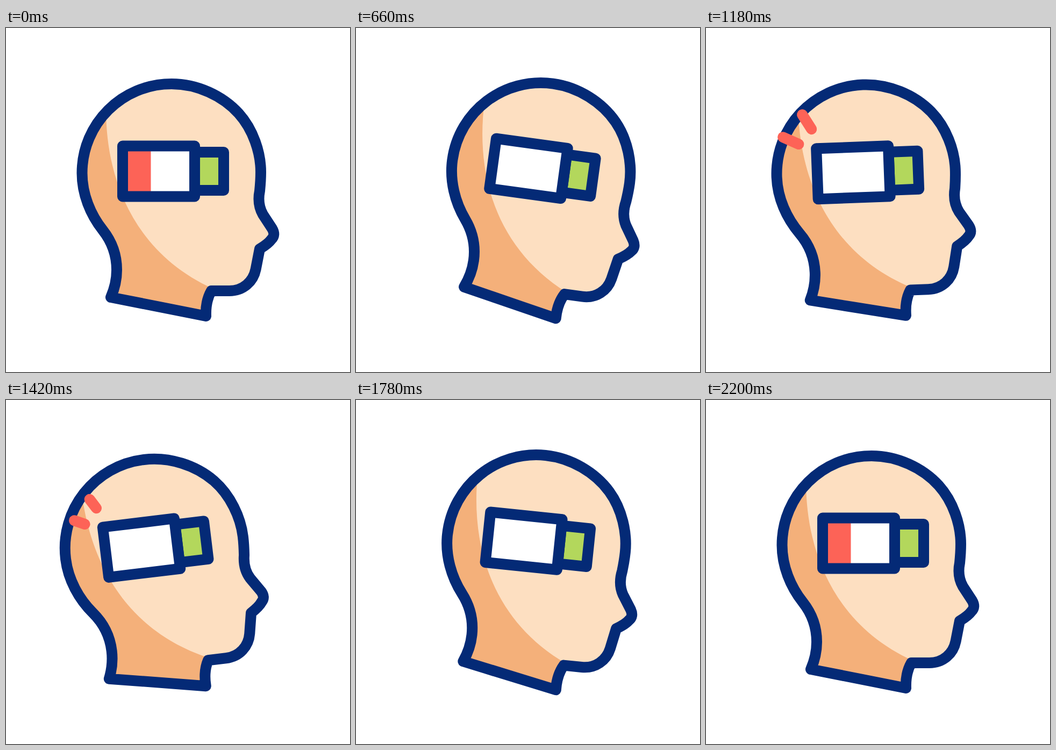
Write an HTML page that moves like this. It is 640x640 px and loops after 2400 ms.

```html
<!DOCTYPE html>
<html lang="en">
<head>
<meta charset="utf-8">
<title>Low battery head</title>
<style>
  html, body { margin: 0; width: 100%; height: 100%; overflow: hidden; background: #fff; }
  svg { display: block; width: 100%; height: 100%; }
  .line { stroke: #042a76; stroke-width: 20; stroke-linejoin: round; }
  .spark { stroke: #fd6357; stroke-width: 20; stroke-linecap: round; }
</style>
</head>
<body>
<svg viewBox="0 0 640 640">
  <defs>
    <path id="outline" d="M195 501L372 536Q371 508 382 489H415.5C441 489 460 472 464.6 449L472 411
      C482 405 489 400 494 393Q502 385 495 373L478 347C470 333 469 318 472 303C473 293 474 282 474 268
      C474 232 460 189 433 159C403 126 356 104 308 104C216 104 141.5 178 141.5 270
      C141.5 309 157 347 180 376C199 400 206 427 206 450C206 468 202 485 195 501Z"/>
    <clipPath id="inside"><use href="#outline"/></clipPath>
  </defs>
  <g id="head">
    <use href="#outline" fill="#fddfc1"/>
    <path clip-path="url(#inside)" fill="#f4b07a"
      d="M186 150C186 293 246 422 385 485L400 560H100V150Z"/>
    <use href="#outline" class="line" fill="none"/>
    <rect class="line" x="351" y="231" width="54" height="71" fill="#b3d75c"/>
    <rect x="217" y="219.5" width="134" height="94" fill="#fff"/>
    <rect id="charge" x="217" y="219.5" height="94" fill="#fd6357"/>
    <rect class="line" x="217" y="219.5" width="134" height="94" fill="none"/>
    <line class="spark" x1="209.5" y1="183"/>
    <line class="spark" x1="184.6" y1="210"/>
  </g>
</svg>
<script>
  const LOOP = 2400;
  const head = document.getElementById('head');
  const charge = document.getElementById('charge');
  const sparks = [...document.querySelectorAll('.spark')];
  const sparkDirs = [[-0.506, -0.863], [-0.899, -0.438]];

  // Keys are [time in ms, value], joined with an ease in and out.
  const tilt = [[200, 0], [800, 9], [1400, -7], [1800, 6], [2200, 0]];
  const level = [[200, 52.5], [800, 0], [1800, 0], [2200, 52.5]];
  const sparkLength = [[800, 0], [1000, 32], [1300, 32], [1600, 0]];

  function valueAt(keys, t) {
    if (t <= keys[0][0]) return keys[0][1];
    for (let i = 1; i < keys.length; i++) {
      const [t0, a] = keys[i - 1], [t1, b] = keys[i];
      if (t < t1) {
        const x = (t - t0) / (t1 - t0);
        return a + (b - a) * x * x * (3 - 2 * x);
      }
    }
    return keys[keys.length - 1][1];
  }

  function draw(t) {
    head.setAttribute('transform', `rotate(${valueAt(tilt, t)} 340 536)`);
    charge.setAttribute('width', valueAt(level, t));
    const length = valueAt(sparkLength, t);
    sparks.forEach((spark, i) => {
      const [dx, dy] = sparkDirs[i];
      spark.setAttribute('x2', +spark.getAttribute('x1') + dx * length);
      spark.setAttribute('y2', +spark.getAttribute('y1') + dy * length);
      spark.setAttribute('visibility', length > 0.2 ? 'visible' : 'hidden');
    });
  }

  const start = performance.now();
  function frame() {
    draw((performance.now() - start) % LOOP);
    requestAnimationFrame(frame);
  }
  frame();
</script>
</body>
</html>
```
